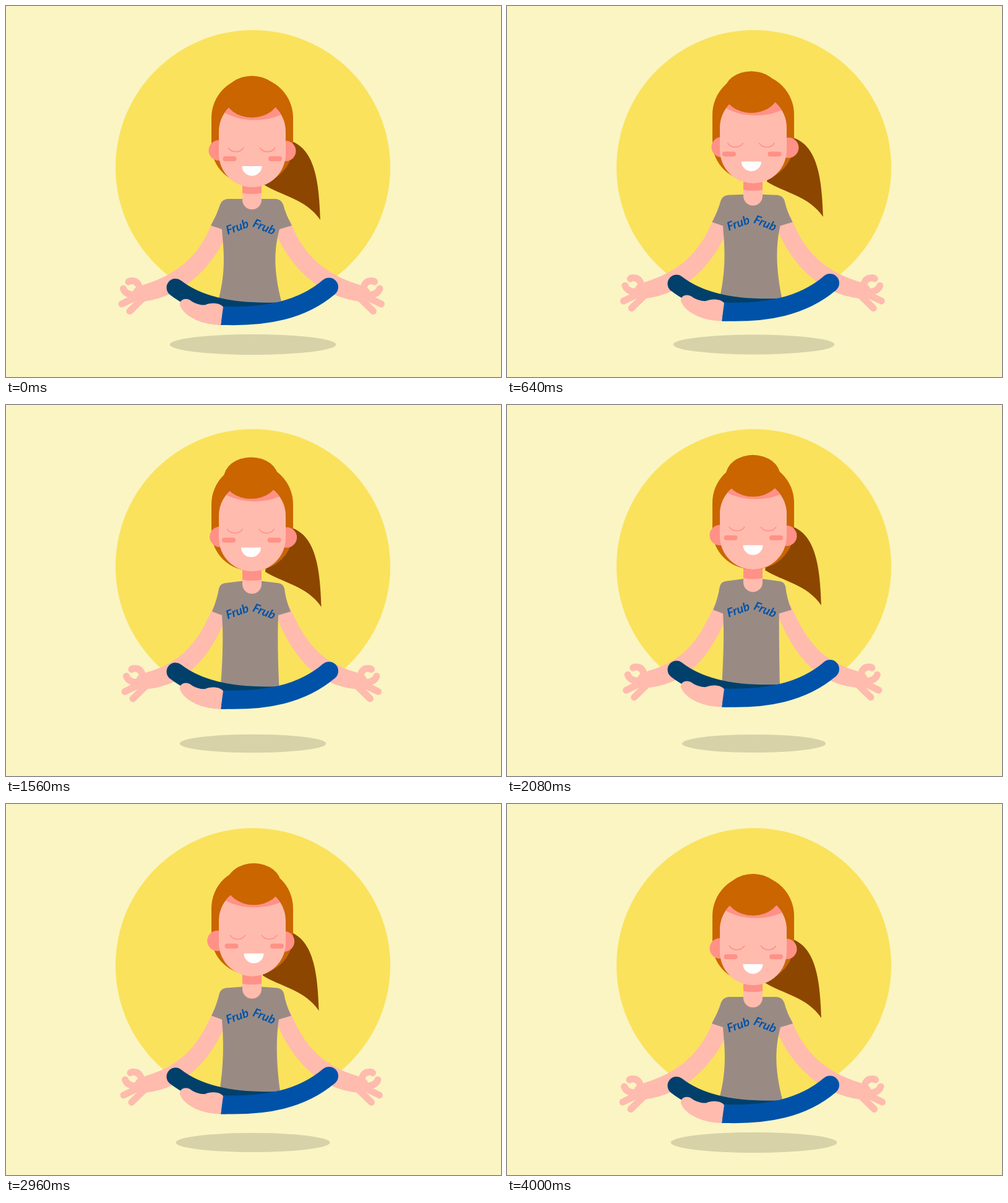
An HTML page with a canvas that plays this animation: 800x600 px, repeating every 4040 ms.

```html
<!DOCTYPE html>
<html lang="en">
<head>
<meta charset="utf-8">
<title>Floating meditation</title>
<style>
html, body { margin: 0; width: 100%; height: 100%; overflow: hidden; background: #faf5c3; }
canvas { display: block; }
</style>
</head>
<body>
<canvas id="stage" width="800" height="600"></canvas>
<script>
const ctx = document.getElementById('stage').getContext('2d');
const LOOP = 4040, RISE = 2000, STEP = 40;
const C = {
  bg: '#faf5c3', sun: '#fae25c', shade: '#d7d2a8', skin: '#ffbbae', pink: '#ff9187',
  hair: '#ca6500', tail: '#8c4600', shirt: '#998b84', dark: '#00406a', blue: '#0052a9'
};
const AXIS = 396.75;

function fill(color, path) {
  ctx.fillStyle = color;
  ctx.fill(new Path2D(path));
}

function line(color, width, path, cap = 'round') {
  ctx.strokeStyle = color;
  ctx.lineWidth = width;
  ctx.lineCap = cap;
  ctx.lineJoin = 'round';
  ctx.stroke(new Path2D(path));
}

function oval(color, x, y, rx, ry = rx) {
  ctx.fillStyle = color;
  ctx.beginPath();
  ctx.ellipse(x, y, rx, ry, 0, 0, Math.PI * 2);
  ctx.fill();
}

function shifted(dx, dy, draw) {
  ctx.save();
  ctx.translate(dx, dy);
  draw();
  ctx.restore();
}

function bothSides(draw) {
  draw();
  ctx.save();
  ctx.translate(AXIS * 2, 0);
  ctx.scale(-1, 1);
  draw();
  ctx.restore();
}

// Point that travels from (x, y) by (dx, dy) as k goes from 0 to 1.
const mover = k => (x, y, dx, dy) => `${x + dx * k},${y + dy * k} `;

function arm(k) {
  const p = mover(k);
  fill(C.skin, 'M' + p(335, 345, 1, -20) +
    'C' + p(318, 395, -6, -17) + p(285, 432, 5, -17) + p(222, 451, 5, -18.5) +
    'L' + p(212, 457, 5, -18.5) + 'L' + p(214, 474, 5, -18.5) + 'L' + p(222, 478, 5, -18.5) +
    'C' + p(285, 470, 5, -16) + p(330, 425, -2, -17) + p(354, 375, -2, -23) +
    'L' + p(365, 345, 0, -20) + 'Z');
  shifted(5 * k, -18.5 * k, () => {
    oval(C.skin, 217, 465, 12);
    line(C.skin, 11, 'M217,460 Q214,444.5 204,444.5 Q200,444 198,446');
    line(C.skin, 11, 'M218,466 L203,467 Q192,465 189.5,457');
    line(C.skin, 11, 'M222,465 L187,482');
    line(C.skin, 11, 'M224,470 L200,493.5');
  });
}

function shirt(k) {
  const p = mover(k);
  fill(C.shirt, 'M' + p(382, 312, 1, -27.5) +
    'L' + p(358, 312, -4, -24) + 'Q' + p(349, 313, -3, -24) + p(346, 321, -2, -24) +
    'Q' + p(341, 337, 0, -22) + p(331, 355, 2, -21) + 'L' + p(349, 361, 0, -21) +
    'C' + p(351, 390, 0, -23) + p(357, 425, -6, -23) + p(343, 477, 4, -22) +
    'L' + p(398, 489, 0, -23) + 'L' + p(446, 481, -4.5, -24) +
    'C' + p(431, 425, 8, -23) + p(434, 390, 5, -23) + p(442, 361, -2, -21) +
    'L' + p(462, 355, -2, -21) +
    'Q' + p(452, 337, 0, -22) + p(448, 321, 2, -24) + 'Q' + p(445, 313, 3, -24) +
    p(436, 312, 4, -24) + 'L' + p(412, 312, -1, -27.5) + 'Z');
}

function word(text, x, y, angle) {
  ctx.save();
  ctx.translate(x, y);
  ctx.rotate(angle);
  ctx.fillText(text, 0, 0);
  ctx.restore();
}

function lettering() {
  ctx.fillStyle = C.blue;
  ctx.font = 'italic 700 19.5px Lato, "Open Sans", sans-serif';
  ctx.textAlign = 'center';
  ctx.textBaseline = 'middle';
  word('Frub', 374, 358, -0.34);
  word('Frub', 417, 358, 0.38);
}

function legs() {
  line(C.dark, 29, 'M274,455.5 C313,486 372,496 437,494');
  line(C.blue, 30, 'M522,454.5 C478,492 420,503.5 348.5,500.8', 'butt');
  oval(C.blue, 522, 454.5, 15);
  fill(C.blue, 'M351,486 H356 V516 H347 Z');
  fill(C.skin, 'M281,484 C280,475 290,471 298,476 C306,482 315,484 322,483.5 ' +
    'C330,479 347,480 351,487 L347,516 C322,516 289,505 281,484 Z');
}

function faceShape() {
  ctx.beginPath();
  ctx.roundRect(344, 149, 108, 144, 54);
}

function head(e, turn, earTurn) {
  const back = -23 * e, skull = -27 * e, front = -32.3 * e;

  shifted(0, back, () => {
    fill(C.hair, 'M332,181 A66,66 0 0 1 464,181 L464,226 A66,63 0 0 1 332,226 Z');
  });
  shifted(earTurn, back, () => {
    oval(C.pink, 344, 233.5, 16.5);
    oval(C.pink, 452, 234.5, 16.5);
  });

  ctx.save();
  ctx.translate(0, skull);
  faceShape();
  ctx.fillStyle = C.skin;
  ctx.fill();
  ctx.clip();
  ctx.translate(0, front - skull);
  oval(C.pink, 402, 134.5, 75, 50);
  ctx.restore();

  shifted(turn, front, () => {
    oval(C.hair, 397.5, 146.7, 44, 33.7);
    for (const x of [371.5, 422.5])
      line(C.pink, 1.5, `M${x - 12.5},229 C${x - 7},238 ${x + 7},238 ${x + 12.5},229`, 'butt');
    ctx.fillStyle = C.pink;
    ctx.beginPath();
    ctx.roundRect(350.5, 243, 22, 8, 4);
    ctx.roundRect(424, 243, 22, 8, 4);
    ctx.fill();
    fill('#fff', 'M381.5,259 H413.5 A16,15.7 0 0 1 381.5,259 Z');
  });
}

function neck(e) {
  shifted(0, -26.7 * e, () => {
    fill(C.skin, 'M382,275 H413 V313.5 A15.5,15.5 0 0 1 382,313.5 Z');
  });
  shifted(0, -22.5 * e, () => {
    fill(C.pink, 'M382,265 H413 V302.5 Q397.5,305.5 382,302.5 Z');
  });
}

function draw(t) {
  const time = Math.min(t, RISE * 2);
  const e = (1 - Math.cos(Math.PI * time / RISE)) / 2;
  const swing = Math.sin(Math.PI * time / RISE) ** 2;
  const turn = swing * (time < RISE ? -3.6 : 3);
  const earTurn = swing * (time < RISE ? 4.1 : -2.3);
  const k = e / 0.885;

  ctx.fillStyle = C.bg;
  ctx.fillRect(0, 0, 800, 600);
  oval(C.sun, 399, 261, 222);
  oval(C.shade, 399, 547.5, 134.3 - 18.2 * e, 16.5 - 1.9 * e);

  shifted(earTurn, -22 * e, () =>
    fill(C.tail, 'M460,218 C499,232 506,283 508,346 C485,312 445,307 417,289 L430,240 Z'));
  bothSides(() => arm(k));
  shirt(k);
  shifted(0, -26.5 * e, lettering);
  neck(e);
  head(e, turn, earTurn);
  shifted(0, -27.5 * e, legs);
}

const start = performance.now();
function tick() {
  const t = (performance.now() - start) % LOOP;
  draw(Math.floor(t / STEP) * STEP);
  requestAnimationFrame(tick);
}
tick();
</script>
</body>
</html>
```
